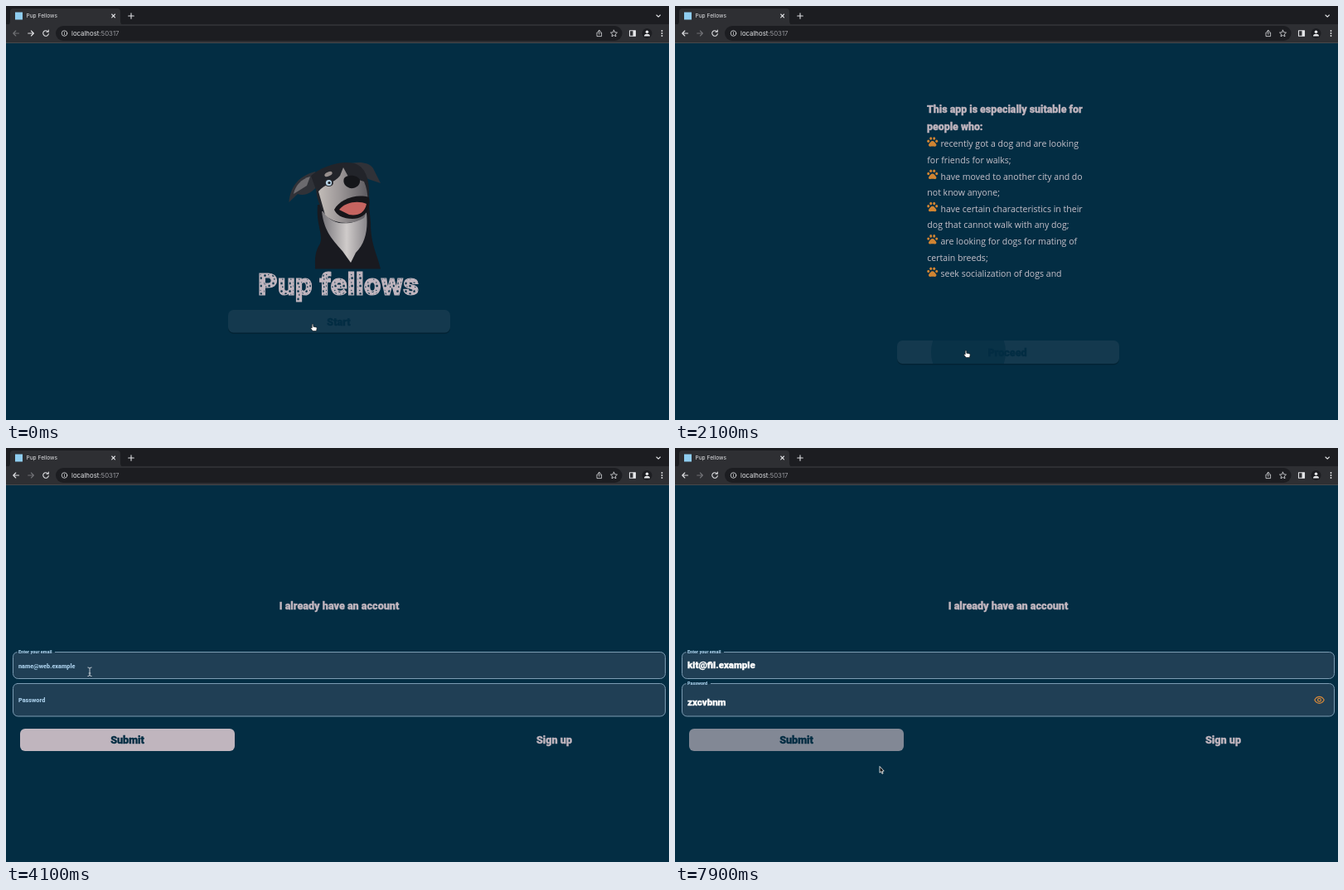
An HTML page that plays this animation: 800 px wide and 500 px high, repeating every 8000 ms.

```html
<!DOCTYPE html>
<html lang="en">
<head>
<meta charset="utf-8">
<title>Pup Fellows</title>
<style>
  :root { --sea: #032d43; --pink: #c0b5be; --sky: #a6cbe6; --amber: #d3873a; --bar: #2e2f33; --strip: #1c1d21; }
  html, body { margin: 0; width: 100%; height: 100%; overflow: hidden; background: var(--sea); }
  svg { display: block; width: 100vw; height: 100vh; }

  .sea { fill: var(--sea); }
  .pink { fill: var(--pink); }
  .bar { fill: var(--bar); }
  .strip { fill: var(--strip); }
  .bold { font: 900 12.6px Roboto, "Open Sans", sans-serif; stroke-width: .35; }
  .bold.sea { stroke: var(--sea); }
  .bold.pink { stroke: var(--pink); }
  .body { font: 10.55px "Open Sans", "Noto Sans", sans-serif; fill: #c6c1ca; }
  .ui { font-family: Inter, Roboto, sans-serif; fill: #e3e4e7; }
  .mid { text-anchor: middle; }
  .label { font-size: 7.3px; fill: var(--sky); }
  .typed { font-size: 11.5px; fill: #fff; stroke: #fff; }
  .title { font-size: 36.8px; fill: url(#spots); stroke: var(--pink); stroke-width: 1.2; }
  .fill { fill: #203f55; }
  .edge { fill: none; stroke: #7d9cb3; }
  .shadow { fill: #000; opacity: .22; }
  .icon { fill: none; stroke: #dfe0e3; stroke-width: 1.1; stroke-linecap: round; stroke-linejoin: round; }

  /* one 8 s loop, sampled ten times a second: 1.25% = 100 ms */
  .a { animation: 8s step-end infinite; }

  @keyframes leave1 {
    0% { transform: none; } 16.25% { transform: translate(-231px); }
    17.5% { transform: translate(-256px); } 18.75% { transform: translate(-264px); }
    20%, 100% { transform: translate(-267px); }
  }
  @keyframes enter2 {
    0% { transform: translate(800px); } 16.25% { transform: translate(106px); }
    17.5% { transform: translate(31px); } 18.75% { transform: translate(8px); }
    20%, 100% { transform: none; }
  }
  @keyframes leave2 {
    0% { transform: none; } 27.5% { transform: translate(-229px); }
    28.75% { transform: translate(-253px); } 30% { transform: translate(-264px); }
    31.25%, 100% { transform: translate(-267px); }
  }
  @keyframes enter3 {
    0% { transform: translate(800px); } 27.5% { transform: translate(112px); }
    28.75% { transform: translate(30.5px); } 30% { transform: translate(8px); }
    31.25%, 100% { transform: none; }
  }

  /* hovering mixes the page colour into a button */
  @keyframes hover1 {
    0% { fill: color-mix(in srgb, var(--sea) 91%, var(--pink)); }
    1.25% { fill: color-mix(in srgb, var(--sea) 93%, var(--pink)); }
    2.5%, 100% { fill: color-mix(in srgb, var(--sea) 95%, var(--pink)); }
  }
  @keyframes hover2 {
    0% { fill: var(--pink); }
    22.5% { fill: color-mix(in srgb, var(--sea) 50%, var(--pink)); }
    23.75% { fill: color-mix(in srgb, var(--sea) 88%, var(--pink)); }
    25%, 100% { fill: color-mix(in srgb, var(--sea) 91%, var(--pink)); }
  }
  @keyframes hover3 {
    0% { fill: var(--pink); }
    97.5% { fill: color-mix(in srgb, var(--sea) 20%, var(--pink)); }
    98.75%, 100% { fill: color-mix(in srgb, var(--sea) 33%, var(--pink)); }
  }
  @keyframes ripple1 { 0% { r: 0; } 13.75% { r: 42px; } 15% { r: 49px; } 16.25% { r: 57px; } 17.5%, 100% { r: 66px; } }
  @keyframes ripple2 { 0% { r: 0; } 26.25% { r: 45px; } 27.5% { r: 53px; } 28.75% { r: 62px; } 30%, 100% { r: 70px; } }

  @keyframes float1 {
    0% { transform: translate(15px, 265.2px); } 43.75% { transform: translate(15px, 256px) scale(.87); }
    45%, 100% { transform: translate(15px, 248.4px) scale(.75); }
  }
  @keyframes float2 {
    0% { transform: translate(15px, 307px); } 65% { transform: translate(15px, 296px) scale(.87); }
    66.25%, 100% { transform: translate(15px, 286.4px) scale(.75); }
  }
  @keyframes gap1 { 0% { opacity: 1; } 45%, 100% { opacity: 0; } }
  @keyframes gap2 { 0% { opacity: 1; } 66.25%, 100% { opacity: 0; } }
  @keyframes hint { 0% { opacity: 0; } 45% { opacity: .6; } 46.25% { opacity: 1; } 56.25%, 100% { opacity: 0; } }
  @keyframes eye { 0% { opacity: 0; } 65%, 100% { opacity: 1; } }

  @keyframes lit { 0% { stroke: #707175; } 16.25%, 100% { stroke: #dfe0e3; } }
  @keyframes dim { 0% { stroke: #dfe0e3; } 16.25%, 100% { stroke: #707175; } }

  @keyframes point {
    0% { transform: translate(370px, 384px); } 20% { transform: translate(368px, 388px); }
    21.25% { transform: translate(362px, 398px); } 22.5% { transform: translate(355px, 410px); }
    23.75% { transform: translate(351px, 416px); } 28.75% { transform: translate(352px, 415.5px); }
    31.25% { transform: translate(340px, 405px); } 32.5% { transform: translate(300px, 378px); }
    33.75% { transform: translate(246px, 332px); } 35% { transform: translate(180px, 308px); }
    36.25% { transform: translate(135px, 287px); } 37.5% { transform: translate(110px, 273px); }
    38.75% { transform: translate(101px, 269px); } 40% { transform: translate(101px, 270px); }
    97.5% { transform: translate(250px, 387px); } 98.75%, 100% { transform: translate(247px, 385px); }
  }
  @keyframes hand { 0% { opacity: 1; } 15% { opacity: 0; } 22.5% { opacity: 1; } 28.75%, 100% { opacity: 0; } }
  @keyframes arrow {
    0% { opacity: 0; } 15% { opacity: 1; } 22.5% { opacity: 0; }
    28.75% { opacity: 1; } 35% { opacity: 0; } 97.5%, 100% { opacity: 1; }
  }
  @keyframes beam { 0% { opacity: 0; } 35% { opacity: 1; } 56.25%, 100% { opacity: 0; } }
</style>
</head>
<body>
<svg viewBox="0 0 800 500" preserveAspectRatio="none">
  <defs>
    <pattern id="spots" width="10" height="9.5" patternUnits="userSpaceOnUse">
      <rect class="pink" width="10" height="9.5"/>
      <g class="sea">
        <circle cx="2.5" cy="2.6" r="1.3"/><circle cx="6.8" cy="1.4" r=".7"/>
        <circle cx="7.6" cy="5.6" r="1.4"/><circle cx="3.8" cy="6.8" r=".8"/>
      </g>
    </pattern>
    <linearGradient id="chest">
      <stop offset="0" stop-color="#77757a"/><stop offset=".55" stop-color="#cfcbca"/><stop offset="1" stop-color="#89868a"/>
    </linearGradient>
    <linearGradient id="face">
      <stop offset="0" stop-color="#c2bcb8"/><stop offset=".45" stop-color="#9a9596"/><stop offset="1" stop-color="#5d5b60"/>
    </linearGradient>
    <clipPath id="startBox"><rect x="268" y="367" width="268" height="27.5" rx="6.5"/></clipPath>
    <clipPath id="nextBox"><rect x="268" y="404" width="268" height="28" rx="6.5"/></clipPath>
    <g id="paw" fill="#d08432">
      <ellipse cx="-5" cy="-.8" rx="1.5" ry="1.7"/><ellipse cx="-2" cy="-4" rx="1.5" ry="1.8"/>
      <ellipse cx="2" cy="-4" rx="1.5" ry="1.8"/><ellipse cx="5" cy="-.8" rx="1.5" ry="1.7"/>
      <path d="M0-.9C2-.9 2.9 1.2 4.2 2.6C5.4 4 4.6 5.9 2.8 5.7C1 5.4-1 5.4-2.8 5.7C-4.6 5.9-5.4 4-4.2 2.6C-2.9 1.2-2-.9 0-.9Z"/>
    </g>
  </defs>

  <!-- welcome -->
  <g class="a" style="animation-name:leave1">
    <rect class="sea" width="800" height="500"/>
    <g id="dog">
      <path fill="#191a20" d="M376 240C374 265 383 275 379 287C372 297 373 308 373 317.500H452C448 300 440 288 440 262L438 240Z"/>
      <path fill="url(#chest)" d="M381 248C384 274 396 284 406 296L416 310L422 298C434 286 437 270 435 250Z"/>
      <path fill="#303238" d="M341.500 237C343 220 351 206 373 200L379 211C374 224 360 231 352 227Z"/>
      <path fill="#6b6a6e" d="M347 227C349 217 356 209 367 206L363 217Z"/>
      <path fill="#303238" d="M416 190C428 188 438 189 443 196L452 214L437 209Z"/>
      <path fill="#22242a" d="M368 205C380 194 404 186 420 190C438 195 440 220 437 240C434 258 420 264 402 262C384 258 376 240 374 222Z"/>
      <path fill="url(#face)" d="M377 224C384 215 396 214 403 205L407 195L413 206L432 212C438 225 438 245 432 256C418 265 396 264 385 252Z"/>
      <ellipse cx="389" cy="203" rx="5" ry="2.500" fill="#98908e" transform="rotate(-25 389 203)"/>
      <ellipse cx="389.500" cy="213.500" rx="5.500" ry="4.500" fill="#26272c"/>
      <circle cx="389.500" cy="213.500" r="3.600" fill="#b8d3e6"/>
      <circle cx="390" cy="213.500" r="1.600" fill="#17191d"/>
      <path fill="#15161a" d="M408 208C412 203 424 204 427 210C428 217 421 221 415 220C409 218 406 213 408 208Z"/>
      <path fill="#17161a" d="M396 246C402 234 422 226 438 231C441 245 433 257 418 257C408 257 400 254 396 246Z"/>
      <path fill="#c66460" d="M402 246C410 236 426 235 435 239C433 250 424 254 414 252Z"/>
    </g>
    <text class="bold title" x="304" y="349">Pup fellows</text>
    <rect class="shadow" x="268" y="368.500" width="268" height="27.500" rx="6.500"/>
    <rect class="a" x="268" y="367" width="268" height="27.500" rx="6.500" style="animation-name:hover1"/>
    <g clip-path="url(#startBox)">
      <circle class="sea a" cx="373" cy="381" r="0" opacity=".85" style="animation-name:ripple1"/>
    </g>
    <text class="bold sea mid" x="401.500" y="385.500">Start</text>
  </g>

  <!-- who it is for -->
  <g class="a" style="animation-name:enter2"><g class="a" style="animation-name:leave2">
    <rect class="sea" width="800" height="500"/>
    <g class="bold pink" style="font-size:12.4px">
      <text x="304" y="128.500">This app is especially suitable for</text>
      <text x="304" y="149.700">people who:</text>
    </g>
    <g id="list" class="body"></g>
    <rect class="shadow" x="268" y="405.500" width="268" height="28" rx="6.500"/>
    <rect class="a" x="268" y="404" width="268" height="28" rx="6.500" style="animation-name:hover2"/>
    <g clip-path="url(#nextBox)">
      <circle class="sea a" cx="354" cy="418" r="0" opacity=".6" style="animation-name:ripple2"/>
    </g>
    <text class="bold sea mid" x="401" y="422.500">Proceed</text>
  </g></g>

  <!-- sign in -->
  <g class="a" style="animation-name:enter3">
    <rect class="sea" width="800" height="500"/>
    <text class="bold pink mid" x="402" y="194.500">I already have an account</text>

    <rect class="fill" x="8.500" y="246.500" width="787" height="32" rx="6"/>
    <path class="edge" d="M59 246.500H789.500a6 6 0 0 1 6 6v20a6 6 0 0 1-6 6H14.500a6 6 0 0 1-6-6v-20a6 6 0 0 1 5-5.900"/>
    <path class="edge a" d="M13 246.500H59" style="animation-name:gap1"/>
    <text class="bold label a" style="animation-name:float1">Enter your email</text>
    <text class="bold label a" x="15" y="266" style="animation-name:hint">name@web.example</text>
    <text id="email" class="bold typed" x="15" y="266"></text>

    <rect class="fill" x="8.500" y="284.500" width="787" height="39.500" rx="6"/>
    <path class="edge" d="M43 284.500H789.500a6 6 0 0 1 6 6v27.500a6 6 0 0 1-6 6H14.500a6 6 0 0 1-6-6v-27.500a6 6 0 0 1 5-5.900"/>
    <path class="edge a" d="M13 284.500H43" style="animation-name:gap2"/>
    <text class="bold label a" style="animation-name:float2">Password</text>
    <text id="pass" class="bold typed" x="15" y="311.300"></text>
    <g class="a" fill="none" stroke="var(--amber)" stroke-width="1.200" style="animation-name:eye">
      <path d="M771.800 304.300C774.500 299 780.500 299 783.200 304.300C780.500 309.600 774.500 309.600 771.800 304.300Z"/>
      <circle cx="777.500" cy="304.300" r="1.900"/>
    </g>
    <rect id="caret" width="1.100" height="15.500" fill="var(--amber)" opacity="0"/>

    <rect class="a" x="17" y="339" width="259" height="27" rx="6" style="animation-name:hover3"/>
    <text class="bold sea mid" x="146.500" y="357">Submit</text>
    <text class="bold pink mid" x="661.500" y="357">Sign up</text>
  </g>

  <!-- browser -->
  <g>
    <rect class="strip" width="800" height="23"/>
    <rect class="bar" y="22" width="800" height="22.500"/>
    <rect y="44" width="800" height="1" fill="#46484c"/>
    <path class="bar" d="M1 23Q5 23 5 18V7Q5 3 9 3H134Q138 3 138 7V18Q138 23 142 23Z"/>
    <rect x="11" y="7.500" width="9" height="9" fill="#8fcdf0"/>
    <text class="ui" x="24.500" y="14.200" font-size="6.600">Pup Fellows</text>
    <rect class="strip" x="60" y="24" width="683.500" height="18" rx="9"/>
    <text class="ui" x="79" y="35.800" font-size="7.800">localhost<tspan fill="#999a9f">:50317</tspan></text>
    <g class="icon">
      <path d="M127.700 10l3.800 3.800m0-3.800l-3.800 3.800M147.700 12h6.600m-3.300-3.300v6.600M785 11l2.200 2.200l2.200-2.200"/>
      <path class="a" style="animation-name:lit" d="M15.500 33H8.800m3-3l-3 3l3 3"/>
      <path class="a" style="animation-name:dim" d="M26.700 33h6.700m-3-3l3 3l-3 3"/>
      <path d="M50.700 31a3.300 3.300 0 1 0 .6 2.600M51.300 29v2.300H49"/>
      <g stroke-width=".8">
        <circle cx="70.500" cy="33" r="3.300"/><path d="M70.500 32.800v1.700M70.500 31.400v.1"/>
        <path d="M714.300 32h-1.300v4.600h5.600V32h-1.300M715.800 34.300v-5m-1.500 1.400l1.500-1.500l1.500 1.500"/>
        <path d="M733.500 29.200l1.200 2.600l2.800.3l-2.100 1.900l.6 2.800l-2.500-1.400l-2.500 1.400l.6-2.800l-2.100-1.900l2.800-.3Z"/>
      </g>
      <rect x="752.500" y="29.800" width="7" height="6.500"/>
    </g>
    <g fill="#e6e7ea">
      <rect x="756.500" y="29.800" width="3" height="6.500"/>
      <circle class="strip" cx="773.500" cy="33" r="6"/>
      <circle cx="773.500" cy="31.200" r="1.800"/><path d="M770 36.400q0-2.600 3.500-2.600t3.500 2.600Z"/>
      <circle cx="791.500" cy="30" r=".9"/><circle cx="791.500" cy="33" r=".9"/><circle cx="791.500" cy="36" r=".9"/>
    </g>
  </g>

  <g id="pointer" class="a" style="animation-name:point">
    <g class="a" style="animation-name:hand">
      <path fill="#fff" stroke="#111" stroke-width=".6" d="M-.8.900C-.8-.2.800-.2.800.900V3.200L4.300 3.900Q5.300 4.200 5.200 5.200L4.500 8.600H.2L-2.200 5.600C-2.600 4.800-1.700 4.300-.8 5Z"/>
    </g>
    <g class="a" style="animation-name:arrow">
      <path fill="#111" stroke="#fff" stroke-width=".8" d="M0-.500V7.200L1.700 5.700L2.900 8.400L4.100 7.900L2.900 5.300L5.200 5.100Z"/>
    </g>
    <g class="a" style="animation-name:beam">
      <path fill="none" stroke="#d5dbe0" stroke-width=".9" d="M-2.500-5Q0-5 0-3.500Q0-5 2.500-5M0-3.500V4M-2.500 5.500Q0 5.500 0 4Q0 5.500 2.500 5.500M-1.300 2h2.600"/>
    </g>
  </g>
</svg>

<script>
  const byId = id => document.getElementById(id);
  const email = byId('email'), pass = byId('pass'), caret = byId('caret');

  const lines = [
    'recently got a dog and are looking', 'for friends for walks;',
    'have moved to another city and do', 'not know anyone;',
    'have certain characteristics in their', 'dog that cannot walk with any dog;',
    'are looking for dogs for mating of', 'certain breeds;',
    'seek socialization of dogs and'
  ];
  byId('list').innerHTML = lines.map((line, i) => {
    const y = 170.2 + i * 19.65, first = i % 2 === 0;
    return (first ? `<use href="#paw" x="310.700" y="${y - 6.2}"/>` : '') +
      `<text x="${first ? 320.5 : 304.3}" y="${y}">${line}</text>`;
  }).join('');

  const ADDRESS = 'kit@fil.example', SECRET = 'zxcvbnm';
  const keyTimes = [5900, 6400, 6600, 6900, 7000, 7100, 7400];
  const EMAIL_FOCUS = 3500, TYPE_START = 4500, PASS_FOCUS = 5200, BLUR = 7800;

  const setText = (node, text) => { if (node.textContent !== text) node.textContent = text; };

  function draw(t) {
    const steps = Math.max(0, Math.floor((t - TYPE_START) / 100) + 1);
    const pressed = keyTimes.filter(k => k <= t);
    setText(email, ADDRESS.slice(0, Math.floor(steps * 2.2)));
    setText(pass, SECRET.slice(0, pressed.length));

    const inPass = t >= PASS_FOCUS;
    const field = inPass ? pass : email;
    const typing = !inPass && steps > 0;
    const since = inPass ? pressed.at(-1) ?? PASS_FOCUS : EMAIL_FOCUS;
    const focused = t >= EMAIL_FOCUS && t < BLUR;
    const on = focused && (typing || (t - since) % 1000 < 500);
    caret.setAttribute('x', 15 + (field.textContent ? field.getComputedTextLength() : 0));
    caret.setAttribute('y', inPass ? 299.3 : 254.3);
    caret.setAttribute('opacity', on ? 1 : 0);
  }

  // share the clock of the CSS animations
  const clock = byId('pointer').getAnimations()[0];
  function tick() {
    draw((clock.currentTime || 0) % 8000);
    requestAnimationFrame(tick);
  }
  tick();
</script>
</body>
</html>
```
